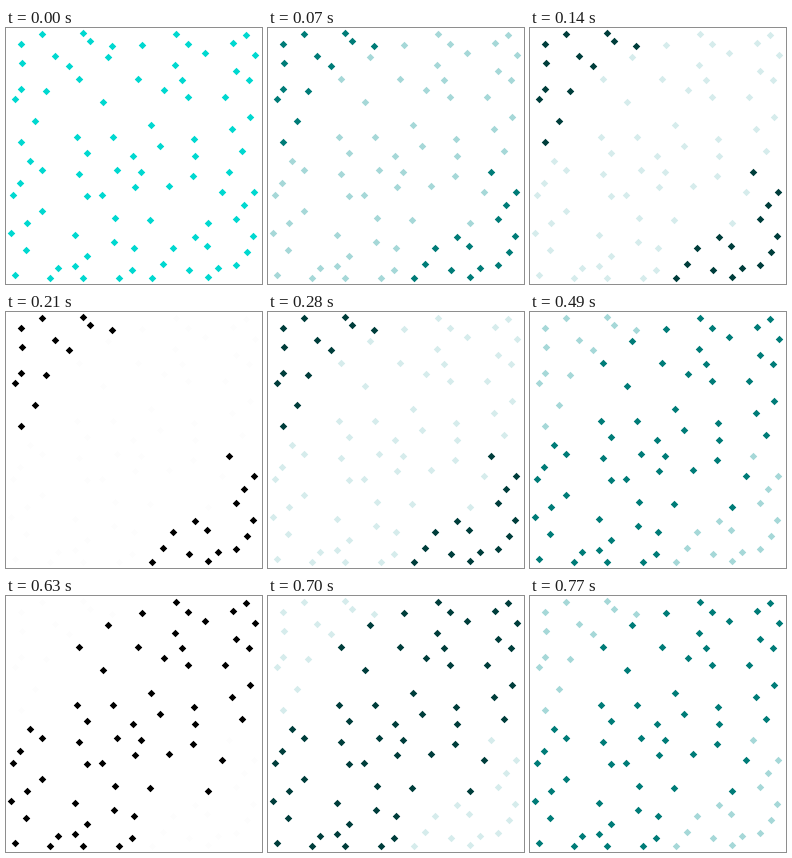
Recreate the animation shown at these times as an HTML page with a canvas. Size 256 by 256 pixels, loop 0.84 s.

```html
<!DOCTYPE html>
<html>
<head>
<meta charset="utf-8">
<style>
html, body { margin: 0; width: 100%; height: 100%; overflow: hidden; background: #fff; }
canvas { display: block; }
</style>
</head>
<body>
<canvas id="stage" width="256" height="256"></canvas>
<script>
const ctx = document.getElementById('stage').getContext('2d');
const STEP = 70;
const darken = ['#00d8d0', '#007c78', '#003e3c', '#000'];
const lighten = ['#00d8d0', '#a6d8d8', '#d6ecec', '#fdfdfd'];

// Points as x, y pairs: the two corner clusters, and the diagonal band between them
const corners = [
  36,6, 77,5, 84,13, 106,18, 15,16, 16,35, 49,28, 63,38, 15,61, 9,71, 40,63, 29,93, 15,114,
  223,144, 248,164, 238,177, 230,191, 247,208, 241,224, 230,237, 212,240, 202,249, 183,242,
  201,218, 189,209, 167,220, 157,236, 146,250
];
const band = [
  170,6, 240,7, 227,15, 182,16, 136,17, 249,27, 199,25, 102,29, 169,37, 230,43, 243,52, 176,52,
  132,51, 73,51, 158,62, 182,69, 219,69, 97,74, 244,89, 145,97, 226,101, 71,109, 107,109, 188,111,
  154,118, 236,123, 81,125, 127,128, 189,128, 24,133, 36,142, 111,142, 135,144, 73,146, 187,148,
  14,155, 129,159, 163,158, 216,164, 7,167, 81,168, 96,167, 36,183, 109,190, 144,192, 202,195,
  21,195, 5,205, 69,207, 108,214, 128,220, 20,222, 81,228, 69,238, 52,240, 126,242, 9,247,
  44,250, 77,250, 113,250
];

function drawDiamonds(points, color) {
  const r = 3.8;
  ctx.fillStyle = color;
  ctx.beginPath();
  for (let i = 0; i < points.length; i += 2) {
    const x = points[i] + 0.5, y = points[i + 1] + 0.5;
    ctx.moveTo(x - r, y);
    ctx.lineTo(x, y - r);
    ctx.lineTo(x + r, y);
    ctx.lineTo(x, y + r);
    ctx.closePath();
  }
  ctx.fill();
}

function render(time) {
  const step = Math.floor(time / STEP) % 12;
  const level = Math.min(step % 6, 6 - step % 6);
  const [dark, light] = step < 6 ? [corners, band] : [band, corners];
  ctx.clearRect(0, 0, 256, 256);
  drawDiamonds(light, lighten[level]);
  drawDiamonds(dark, darken[level]);
}

const start = performance.now();
function tick() {
  render(performance.now() - start);
  requestAnimationFrame(tick);
}
tick();
</script>
</body>
</html>
```
